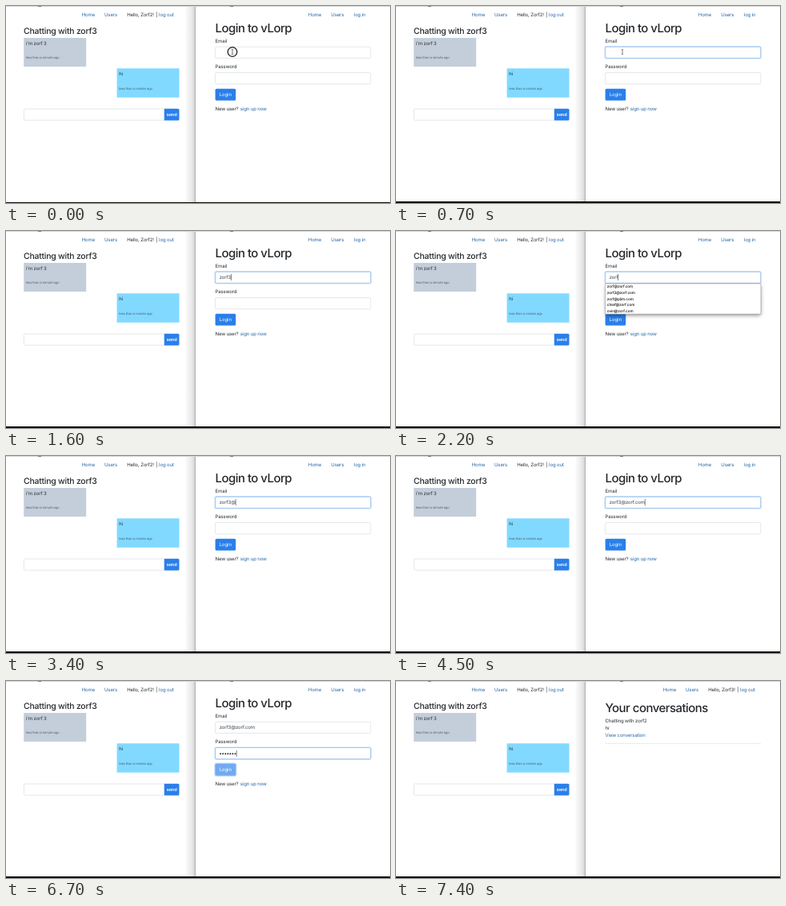
An HTML page with a canvas for the animation above (8000 ms loop, 480 by 247 pixels).

```html
<!DOCTYPE html>
<html lang="en">
<head>
<meta charset="utf-8">
<title>Chat login</title>
<style>
  html, body { margin: 0; width: 100%; height: 100%; overflow: hidden; background: #fff; }
  canvas { display: block; width: 480px; height: 247px; }
</style>
</head>
<body>
<canvas id="stage"></canvas>
<script>
const W = 480, H = 247, LOOP = 8000;
const INK = '#24282c', LINK = '#2464a4', BLUE = '#2a7fea', BORDER = '#d9dde1';
const EMAIL = 'zorf3@zorf.com';
const HINTS = ['zorf@zorf.com', 'zorf2@zorf.com', 'zorf@plim.com', 'chief@zorf.com', 'ovin@zorf.com'];

const canvas = document.getElementById('stage');
const ctx = canvas.getContext('2d');
const dpr = window.devicePixelRatio || 1;
canvas.width = W * dpr;
canvas.height = H * dpr;
ctx.textRendering = 'geometricPrecision';

// Each step changes part of the state from its time on.
const START = { chars: 0, dots: 0, focus: '', caret: false, rows: 0, press: 0, mouse: 2, inside: false };
const STEPS = [
  [100, { focus: 'email', caret: true, mouse: 1 }],
  [700, { caret: false }],
  [1000, { chars: 1, rows: 3, caret: true, mouse: 0 }],
  [1200, { chars: 2 }],
  [1300, { chars: 3, rows: 5 }],
  [1500, { chars: 4 }],
  [1600, { chars: 5, rows: 0 }],
  [2100, { chars: 4, rows: 5 }],
  [2400, { caret: false }],
  [2700, { chars: 5, rows: 0, caret: true }],
  [3000, { caret: false }],
  [3400, { chars: 6, caret: true }],
  [3700, { chars: 7 }],
  [3800, { chars: 8 }],
  [3900, { chars: 9 }],
  [4000, { chars: 10 }],
  [4300, { chars: 12 }],
  [4400, { chars: 13 }],
  [4500, { chars: 14 }],
  [4700, { focus: 'password' }],
  [5000, { caret: false }],
  [5100, { dots: 1 }],
  [5300, { dots: 2 }],
  [5400, { dots: 3, caret: true }],
  [5700, { dots: 5 }],
  [5800, { dots: 7 }],
  [6000, { caret: false }],
  [6600, { press: 0.6, caret: true }],
  [6700, { press: 1 }],
  [7000, { inside: true }]
];

function stateAt(t) {
  const s = { ...START };
  for (const [time, change] of STEPS) if (t >= time) Object.assign(s, change);
  return s;
}

function text(str, x, y, { size = 6, color = INK, weight = 400, track = -0.02, style = 'normal', align = 'left' } = {}) {
  ctx.font = `${style} ${weight} ${size}px Inter, "Liberation Sans", sans-serif`;
  ctx.letterSpacing = `${size * track}px`;
  ctx.textAlign = align;
  ctx.fillStyle = color;
  ctx.fillText(str, x, y);
  return ctx.measureText(str).width;
}

function rect(x, y, w, h, color) {
  ctx.fillStyle = color;
  ctx.fillRect(x, y, w, h);
}

function box(x, y, w, h, r, fill, stroke, line = 0.7) {
  ctx.beginPath();
  ctx.roundRect(x, y, w, h, r);
  if (fill) {
    ctx.fillStyle = fill;
    ctx.fill();
  }
  if (stroke) {
    ctx.strokeStyle = stroke;
    ctx.lineWidth = line;
    ctx.stroke();
  }
}

const link = (str, x, y) => text(str, x, y, { color: LINK });
const title = (str, y) => text(str, 261.5, y, { size: 15, weight: 500, track: -0.036 });

function hello(name, x) {
  link('Home', x, 12.6);
  link('Users', x + 28.3, 12.6);
  text(`Hello, ${name}!`, x + 56.5, 12.6);
  text('|', x + 92.9, 12.6);
  link('log out', x + 96.4, 12.6);
}

function bubble(x, y, h, color, str) {
  box(x, y, 78, h, 0.5, color);
  text(str, x + 2.7, y + 8.8);
  text('less than a minute ago', x + 2.7, y + 26.4, { size: 4.1, color: 'rgba(40,50,60,.7)' });
}

function chatWindow() {
  hello('Zorf2', 94.7);
  text('Chatting with zorf3', 22, 34.6, { size: 10.5, weight: 500, track: -0.024 });
  bubble(22.2, 40, 36, '#c3ceda', "i'm zorf 3");
  bubble(138.6, 78.2, 36.6, '#82d9ff', 'hi');
  box(22.4, 129, 176, 14.2, 1.5, '#fff', BORDER);
  box(197.8, 128.7, 18.7, 14.7, [0, 1.5, 1.5, 0], BLUE);
  text('send', 207.1, 138.4, { size: 5.6, weight: 600, color: '#fff', align: 'center' });
}

function frameEdges(settled) {
  const g = ctx.createLinearGradient(224, 0, 237, 0);
  g.addColorStop(0, '#fff');
  g.addColorStop(0.15, '#f7f7f7');
  g.addColorStop(0.6, '#eaeaea');
  g.addColorStop(1, '#cecece');
  rect(224, 0, 13, H, g);
  rect(236, 0, 1, H, '#b0b0b0');
  rect(0, 0, W, 1, '#d6d6d6');
  for (const x of [40, 280]) rect(x, 0, 4, 1, '#777');
  const top = settled ? 245 : 246;
  rect(0, top, W, H - top, '#080808');
}

function field(y, focused) {
  if (focused) box(261.6, y, 194.2, 14.2, 1.5, null, 'rgba(0,123,255,.2)', 2.2);
  box(261.6, y, 194.2, 14.2, 1.5, '#fff', focused ? '#84b2e4' : BORDER);
}

const caret = (x, y) => rect(x, y, 0.6, 8, '#333');

function hints(rows) {
  const h = rows * 7.6 + 0.1;
  ctx.save();
  ctx.shadowColor = 'rgba(0,0,0,.5)';
  ctx.shadowBlur = 5 * dpr;
  ctx.shadowOffsetY = 1.8 * dpr;
  rect(261.6, 66, 194.4, h, '#fff');
  ctx.restore();
  box(261.6, 66, 194.4, h, 0, null, '#a0a0a0', 0.6);
  HINTS.slice(0, rows).forEach((str, i) =>
    text(str, 263.8, 71.3 + i * 7.65, { size: 4.7, weight: 500, color: '#111' }));
}

function pointer(ring) {
  const x = 283, y = 57.5;
  if (ring) {
    ctx.beginPath();
    ctx.arc(x, y, 5.8, 0, Math.PI * 2);
    ctx.fillStyle = '#f6f6f6';
    ctx.fill();
    ctx.strokeStyle = '#222';
    ctx.lineWidth = 1.3;
    ctx.stroke();
  }
  rect(x - 0.35, y - 2.8, 0.7, 5.6, '#444');
  rect(x - 1.2, y - 3.1, 2.4, 0.6, '#555');
  rect(x - 1.2, y + 2.5, 2.4, 0.6, '#555');
}

function loginButton(press) {
  const shape = [261.6, 103.8, 25.6, 14.8, 1.5];
  if (press) box(...shape, null, `rgba(0,123,255,${0.25 * press})`, 2.4);
  box(...shape, BLUE);
  if (press) box(...shape, `rgba(255,255,255,${0.34 * press})`);
  text('Login', 274.3, 113.3, { color: '#fff', align: 'center' });
}

function loginPage(s) {
  link('Home', 377.8, 12.6);
  link('Users', 406.3, 12.6);
  link('log in', 434.8, 12.6);
  title('Login to vLorp', 32.5);

  text('Email', 261.6, 45.8);
  field(51.2, s.focus === 'email');
  const width = text(EMAIL.slice(0, s.chars), 266.7, 60.4, { color: '#3c4248' });
  if (s.caret && s.focus === 'email') caret(266.6 + width, 54);

  text('Password', 261.6, 78.3);
  field(83.6, s.focus === 'password');
  ctx.fillStyle = '#222';
  for (let i = 0; i < s.dots; i++) {
    ctx.beginPath();
    ctx.arc(268.2 + i * 3.05, 91.2, 0.95, 0, Math.PI * 2);
    ctx.fill();
  }
  if (s.caret && s.focus === 'password') caret(266.5 + s.dots * 3.05, 87);

  loginButton(s.press);
  text('New user?', 261.6, 131.2);
  link('sign up now', 292.8, 131.2);
  if (s.rows) hints(s.rows);
  if (s.mouse) pointer(s.mouse === 2);
}

function homePage() {
  hello('Zorf3', 333.7);
  title('Your conversations', 38.5);
  text('Chatting with zorf2', 261.6, 51.7);
  text('hi', 261.6, 60.8, { style: 'italic' });
  link('View conversation', 261.6, 69.9);
  rect(261.6, 78, 194.4, 0.6, '#dcdcdc');
}

function draw(t) {
  const s = stateAt(t);
  ctx.setTransform(dpr, 0, 0, dpr, 0, 0);
  rect(0, 0, W, H, '#fff');
  chatWindow();
  frameEdges(t >= 100);
  if (s.inside) homePage();
  else loginPage(s);
}

const begin = performance.now();
function tick() {
  draw((performance.now() - begin) % LOOP);
  requestAnimationFrame(tick);
}
tick();
</script>
</body>
</html>
```
